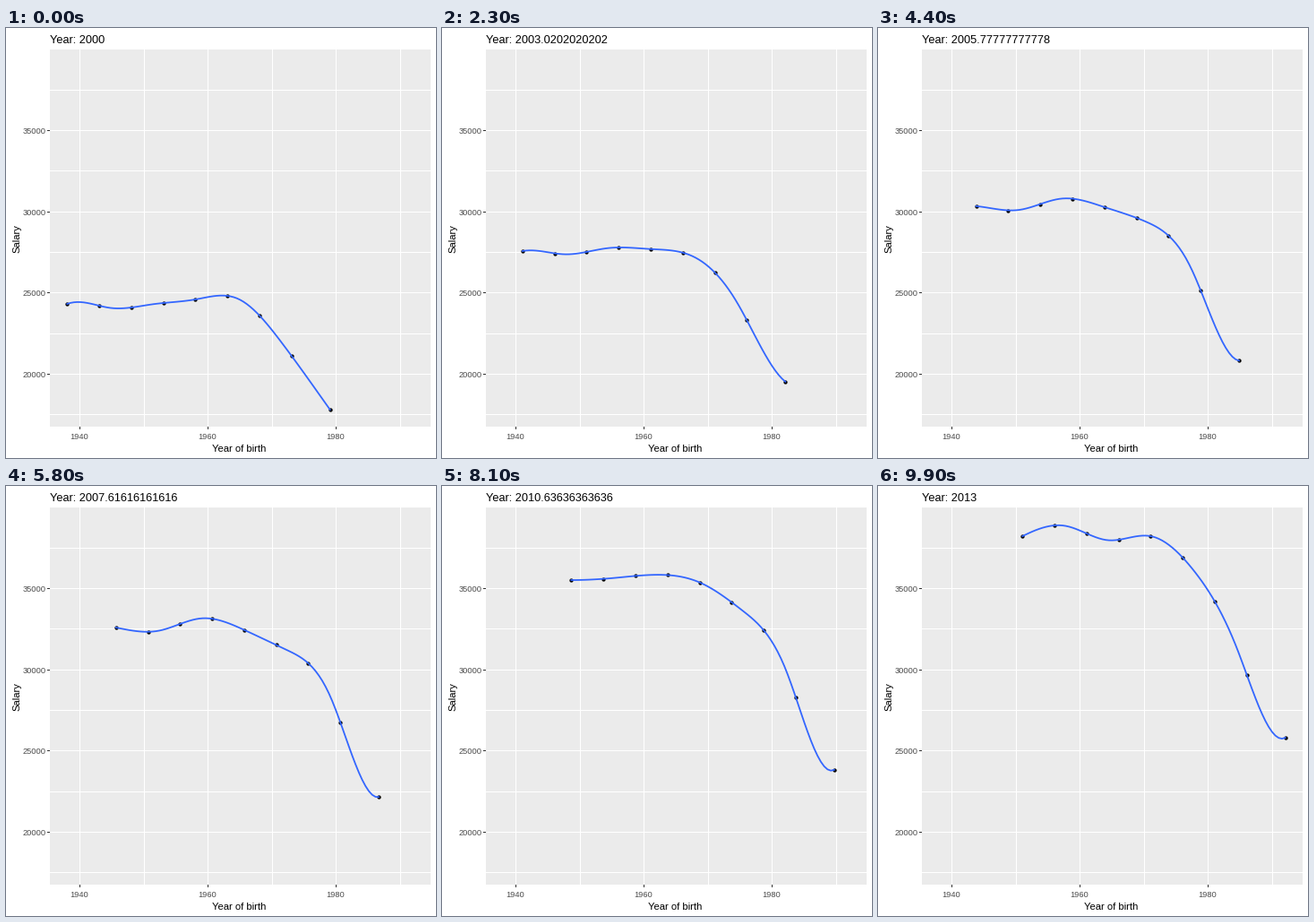
A matplotlib script for the animation above (10 s loop, 480 by 480 pixels).

```python
import numpy as np
import matplotlib.pyplot as plt
from matplotlib.animation import FuncAnimation
from matplotlib.patches import Rectangle

plt.rcParams["font.family"] = "Liberation Sans"

SIZE, DPI = 480, 72
FRAMES, INTERVAL = 100, 100
LEFT, TOP, RIGHT, BOTTOM = 49, 24, 474, 445
PX_YEAR = (RIGHT - LEFT) / 59.4

# Nine cohorts, five years apart, the youngest one year further
COHORT = np.arange(9)
BORN = 1938.0 + 5 * COHORT + (COHORT == 8)

# Salary heights on the stage in the first and the last year
FIRST = np.array([308, 310, 312, 307, 303, 299, 321, 366, 426])
LAST = np.array([56, 44, 53, 60, 56, 80, 129, 211, 281])


def px(year):
    return LEFT + (year - 1935.3) * PX_YEAR


def py(salary):
    return 114.5 + (35000 - salary) * 272 / 15000


def heights(s):
    """Steady growth, a ripple across the cohorts and a shared cycle."""
    ripple = 12 * np.sin(np.pi * s ** 1.5) * np.cos(2 * np.pi * (COHORT - 0.9) / 3.75)
    cycle = -3.5 * np.sin(4 * np.pi * s)
    return FIRST + (LAST - FIRST) * s + ripple + cycle


def spline_basis(x, knots):
    powers = [x ** k for k in range(4)]
    hinges = [np.clip(x - k, 0, None) ** 3 for k in knots]
    return np.column_stack(powers + hinges)


# Cubic regression spline with knots at the quantiles
unit = (BORN - BORN[0]) / (BORN[-1] - BORN[0])
knots = np.quantile(unit, np.arange(1, 6) / 6)
grid = np.linspace(0, 1, 80)
SMOOTH = spline_basis(grid, knots) @ np.linalg.inv(spline_basis(unit, knots))
GRID_BORN = BORN[0] + grid * (BORN[-1] - BORN[0])

fig = plt.figure(figsize=(SIZE / DPI, SIZE / DPI), dpi=DPI, facecolor="white")
ax = fig.add_axes([0, 0, 1, 1])
ax.set_xlim(0, SIZE)
ax.set_ylim(SIZE, 0)
ax.axis("off")


def box(x, y, w, h, color):
    ax.add_patch(Rectangle((x, y), w, h, facecolor=color, lw=0, zorder=1))


def label(x, y, text, size, color="black", ha="center", **kw):
    return ax.text(x, y, text, fontsize=size, color=color, ha=ha,
                   va="baseline", **kw)


box(LEFT, TOP, RIGHT - LEFT, BOTTOM - TOP, "#EBEBEB")

for year in range(1940, 1991, 10):
    x = int(px(year))
    box(x, TOP, 1, BOTTOM - TOP, "white")
    if year % 20 == 0:
        box(x, BOTTOM, 1, 3, "#333333")
        label(x, 459, str(year), 9.3, "#4D4D4D")

for salary in range(17500, 37501, 2500):
    y = int(py(salary))
    box(LEFT, y, RIGHT - LEFT, 1, "white")
    if salary % 5000 == 0:
        box(LEFT - 3, y, 3, 1, "#333333")
        label(44.5, y + 4, str(salary), 9.3, "#4D4D4D", ha="right")

label((LEFT + RIGHT) / 2 - 1, 473, "Year of birth", 11.2)
label(15, (TOP + BOTTOM) / 2 + 1, "Salary", 11.2, rotation=90,
      rotation_mode="anchor")
title = label(LEFT, 17, "", 12.8, ha="left")

dots, = ax.plot([], [], "o", color="black", ms=4.3, mew=0, zorder=2)
curve, = ax.plot([], [], color="#3366FF", lw=1.8, zorder=3)


def draw(i):
    s = i / (FRAMES - 1)
    passed = 13 * i / (FRAMES - 1)
    y = heights(s)
    dots.set_data(px(BORN + passed), y)
    curve.set_data(px(GRID_BORN + passed), SMOOTH @ y)
    title.set_text(f"Year: {2000 + passed:.15g}")
    return dots, curve, title


anim = FuncAnimation(fig, draw, frames=FRAMES, interval=INTERVAL,
                     repeat=True, repeat_delay=0)
plt.show()
```
